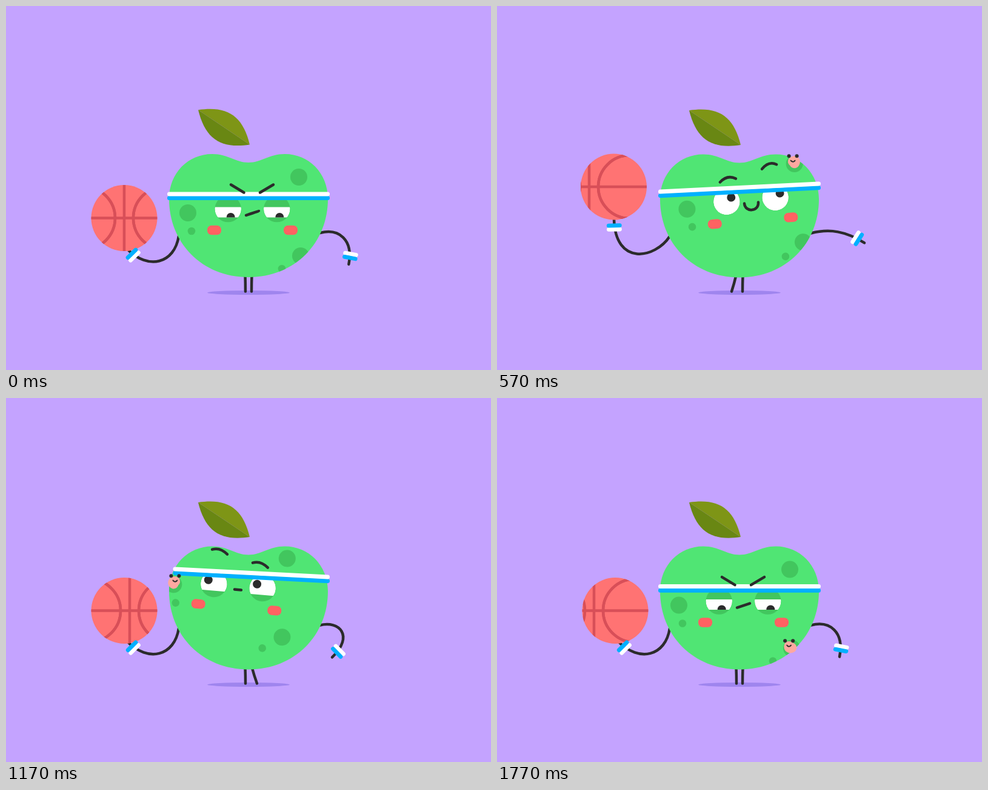
An HTML page with a canvas that plays this animation: 800x600 px, repeating every 1.8 s.

```html
<!DOCTYPE html>
<html>
<head>
<meta charset="utf-8">
<style>
html, body { margin: 0; width: 100%; height: 100%; overflow: hidden; background: #c4a3ff; }
canvas { display: block; }
</style>
</head>
<body>
<canvas id="stage" width="800" height="600"></canvas>
<script>
const g = document.getElementById('stage').getContext('2d');
const LOOP = 1800, BEAT = 600, TAU = Math.PI * 2;
const INK = '#2b2b2b', GREEN = '#50e574', SPOT = '#42c65e', BLUE = '#00b0ff', WHITE = '#fff';

const clamp = x => Math.max(0, Math.min(1, x));
const smooth = x => (x = clamp(x), x * x * (3 - 2 * x));
const lerp = (a, b, p) => a + (b - a) * p;
const mix = (a, b, p) => a.map((v, i) => lerp(v, b[i], p));

// Poses: resting, looking right, looking left. Each beat moves to the next one.
// slow: face x, y, tilt; headband left y, right y; lids; brow arch; brow x's
const SLOW = [
  [6.5, -112.5, 0, -137, -137, -3, 14, 0, -35.5, -14, 12.5, 34.5],
  [19, -128.5, -5, -141.5, -154.5, -22, 22, 10, -48.5, -22, 22.4, 47],
  [-17, -137.5, 5, -165.5, -152.5, -22, 11, 8, -48, -22.5, 20.5, 46]
];
// mid: pupil x, y; mouth half width, left y, right y, depth; brow y's
const MID = [
  [4.5, 13.5, 10.5, 10.5, 3.5, 0, -40, -27, -27, -40],
  [8, -6.3, 11.5, 5.5, 5.5, 15.5, -33, -36.6, -48.7, -54],
  [-9.6, -5.9, 5.5, 6, 6, 0, -56.5, -50.7, -40.4, -34.6]
];
// fast: right hand x, y and its handle; feet; raise of the ball
const FAST = [
  [165, -21, 8, -41, 0, 0, 0],
  [206, -57, -30, -19, -8, 0, 1],
  [138, -20, 37, -36, 0, 9, 0]
];
const SPIN = [0, -40.5, 9, 99];
// x, y, radius, relative to the middle of the eyes
const SPOTS = [[-106.5, 6.5, 14], [-100.5, 36.5, 6.3], [76.5, -52.5, 14], [79.5, 77.5, 14], [48.5, 98.5, 6.3]];
// Worm curves relative to the hole: two handles and the head
const WORMS = [
  { hole: 2, to: [16, -24, 14, -54, -26, -28] },
  { hole: 0, from: [-3, -18, -10, -30, -14, -36], to: [-14, -18, -8, -48, 26, -40] },
  { hole: 3, to: [-21, 12, -45, 11, -45, -23] }
];
const DIP = [463, 456, 463];

function stroke(color, width, path) {
  g.beginPath();
  path();
  g.strokeStyle = color;
  g.lineWidth = width;
  g.stroke();
}
const line = (x1, y1, x2, y2, color, width) =>
  stroke(color, width, () => { g.moveTo(x1, y1); g.lineTo(x2, y2); });
const curve = (x, y, c, color, width) =>
  stroke(color, width, () => { g.moveTo(x, y); g.bezierCurveTo(...c); });
const arch = (x1, y1, x2, y2, lift) =>
  stroke(INK, 4.5, () => { g.moveTo(x1, y1); g.quadraticCurveTo((x1 + x2) / 2, (y1 + y2) / 2 - lift, x2, y2); });
function oval(x, y, rx, ry, color) {
  g.beginPath();
  g.ellipse(x, y, rx, ry, 0, 0, TAU);
  g.fillStyle = color;
  g.fill();
}
const dot = (x, y, r, color) => oval(x, y, r, r, color);
function group(draw) {
  g.save();
  draw();
  g.restore();
}

// Squash and stretch over one beat: [foot of the body, vertical scale]
function bounce(t, dip) {
  const keys = [[0, 447, 1], [120, dip, 0.958], [260, 441.5, 1.015], [360, 446, 1.004], [540, 448, 0.999], [BEAT, 447, 1]];
  const i = keys.findIndex(k => k[0] > t);
  const a = keys[i - 1], b = keys[i];
  const p = (1 - Math.cos(Math.PI * (t - a[0]) / (b[0] - a[0]))) / 2;
  return [lerp(a[1], b[1], p), lerp(a[2], b[2], p)];
}

function applePath() {
  g.beginPath();
  g.moveTo(0, -189);
  g.bezierCurveTo(22, -189, 33, -203, 60, -203);
  g.bezierCurveTo(99, -203, 131, -172, 131, -129);
  g.bezierCurveTo(131, -57, 77, 0, 0, 0);
  g.bezierCurveTo(-77, 0, -131, -57, -131, -129);
  g.bezierCurveTo(-131, -172, -99, -203, -60, -203);
  g.bezierCurveTo(-33, -203, -22, -189, 0, -189);
}

function leaf(y, angle) {
  group(() => {
    g.translate(402, y);
    g.rotate(angle * Math.PI / 180);
    for (const [side, color] of [[-1, '#7e9516'], [1, '#698713']]) {
      g.beginPath();
      g.moveTo(0, 0);
      g.bezierCurveTo(-36, 33 * side, -66, 33 * side, -102.5, 0);
      g.fillStyle = color;
      g.fill();
    }
  });
}

function ball(x, y, sy, tilt, spin) {
  group(() => {
    g.translate(x, y);
    g.rotate(tilt * Math.PI / 180);
    g.scale(1, sy);
    dot(0, 0, 54.5, '#ff7373');
    g.clip();
    const seam = path => stroke('#d84f58', 4.5, path);
    seam(() => { g.moveTo(-60, 0); g.lineTo(60, 0); });
    for (let k = -1; k < 2; k++) {
      const u = spin + k * 134;
      seam(() => { g.moveTo(u, -60); g.lineTo(u, 60); });
      for (const s of [-67, 67]) seam(() => g.arc(u + s, 0, 52, 0, TAU));
    }
  });
}

// Two stripes around an arm, the blue one nearer to the hand
function wristband(x, y, dx, dy) {
  const n = Math.hypot(dx, dy), far = 14;
  group(() => {
    g.translate(x + dx / n * far, y + dy / n * far);
    g.rotate(Math.atan2(dy, dx));
    line(3.2, -9, 3.2, 9, WHITE, 6.8);
    line(-3.2, -9, -3.2, 9, BLUE, 6.8);
  });
}

function eye(x, top, bottom, px, py) {
  group(() => {
    g.translate(x, 0);
    dot(0, 0, 21.8, SPOT);
    g.clip();
    g.beginPath();
    g.rect(-23, top, 46, bottom - top);
    g.clip();
    dot(0, 0, 21.8, WHITE);
    dot(px, py, 7, INK);
  });
}

function worm(x, y, c) {
  const [hx, hy] = [x + c[4], y + c[5]];
  curve(x, y, c.map((v, i) => v + (i % 2 ? y : x)), '#ffa8a0', 16.5);
  for (const s of [-6.5, 6.5]) dot(hx + s, hy - 9, 3, INK);
  stroke(INK, 2, () => g.arc(hx, hy - 3.5, 3.8, 0.5, Math.PI - 0.5));
}

function draw(t) {
  const beat = Math.floor(t / BEAT), b = t - beat * BEAT, next = (beat + 1) % 3;
  const slow = smooth(b / 360), mid = smooth(b / 210), fast = 1 - (1 - clamp(b / 240)) ** 2;
  const [fx, fy, deg, bandL, bandR, lidTop, lidLow, lift, ...browX] = mix(SLOW[beat], SLOW[next], slow);
  const [px, py, mw, ml, mr, depth, ...browY] = mix(MID[beat], MID[next], mid);
  const [ex, ey, cx, cy, footL, footR, raise] = mix(FAST[beat], FAST[next], fast);
  const [base, sy] = bounce(b, DIP[beat]);
  const squash = (1 - sy) / 0.042, tilt = deg * Math.PI / 180;
  const blink = beat === 2 ? clamp(1.6 - Math.abs(b - 120) / 60) : 0;

  g.fillStyle = '#c4a3ff';
  g.fillRect(0, 0, 800, 600);
  g.lineCap = 'round';
  oval(400, 472.5, 68, 3.5, '#9f85ee');

  // legs
  const bend = Math.max(0, base - 452) * 0.8;
  for (const [s, foot] of [[-1, footL], [1, footR]])
    stroke(INK, 4.5, () => {
      g.moveTo(400 + s * 5.5, base - 4);
      g.quadraticCurveTo(400 + s * (5 + bend) + foot / 2, (base + 469) / 2, 400 + s * 5 + foot, 470.5);
    });

  // left arm and ball
  const bx = 195 - 2.5 * raise + 1.5 * squash, by = base - (97 + 52.5 * raise) * sy;
  const hx = bx + lerp(5, 0.5, raise) - 1.5 * squash, hy = by + 51 + 2 * raise;
  const kx = lerp(35, 2, raise), ky = lerp(35, 78, raise);
  const sx = 285, sh = base - 68 * sy;
  curve(sx, sh, [sx - 7 - 17 * raise, sh + 46 - 9 * raise, hx + kx, hy + ky, hx, hy], INK, 4.5);
  ball(bx, by, sy, 2 * Math.max(0, squash), lerp(SPIN[beat], SPIN[beat + 1], beat === 2 ? mid : slow));
  wristband(hx, hy, kx, ky);

  // right arm
  const rx = 400 + ex, ry = base + ey, rs = base - 73 * sy;
  curve(518, rs, [549, rs - 8, rx + cx, ry + cy, rx, ry], INK, 4.5);
  wristband(rx, ry, cx, cy);

  leaf(base - 218.5 * sy, 34 - 11 * squash);

  group(() => {
    g.translate(400, base);
    g.scale(1, sy);
    const inFace = paint => group(() => {
      g.translate(fx, fy);
      g.rotate(tilt);
      paint();
    });

    group(() => {
      applePath();
      g.fillStyle = GREEN;
      g.fill();
      g.clip();
      inFace(() => {
        for (const [x, y, r] of SPOTS) dot(x, y, r, SPOT);
        const low = lerp(lidLow, lidTop, blink);
        for (const x of [-40.3, 40.3]) eye(x, lidTop, low, px, py);
        g.fillStyle = '#ff6262';
        for (const x of [-63, 63]) {
          g.beginPath();
          g.roundRect(x - 11.5, 27.3, 23, 15.4, 7);
          g.fill();
        }
        curve(-mw, ml, [-mw, ml + depth, mw, mr + depth, mw, mr], INK, 4.5);
      });
    });

    const inset = Math.max(0, -158 - bandL) * 1.27;
    line(inset - 130.5, bandL + 6.6, 130.5, bandR + 6.6, BLUE, 7);
    line(inset - 130.5, bandL, 130.5, bandR, WHITE, 7);

    inFace(() => {
      const y = browY.map(v => v + 7 * Math.max(0, squash));
      for (const i of [0, 2]) arch(browX[i], y[i], browX[i + 1], y[i + 1], lift);
    });
  });

  // worm of this beat
  const out = (1 - (1 - clamp(b / 200)) ** 3) * (1 - smooth((b - 450) / 150));
  if (out > 0.02) {
    const w = WORMS[beat], [x, y] = SPOTS[w.hole];
    const shape = mix(w.from || w.to, w.to, smooth((b - 120) / 180)).map(v => v * out);
    const c = Math.cos(tilt), s = Math.sin(tilt);
    worm(400 + fx + x * c - y * s, base + sy * (fy + x * s + y * c) - 1, shape);
  }
}

const start = performance.now();
function tick() {
  draw((performance.now() - start) % LOOP);
  requestAnimationFrame(tick);
}
tick();
</script>
</body>
</html>
```
